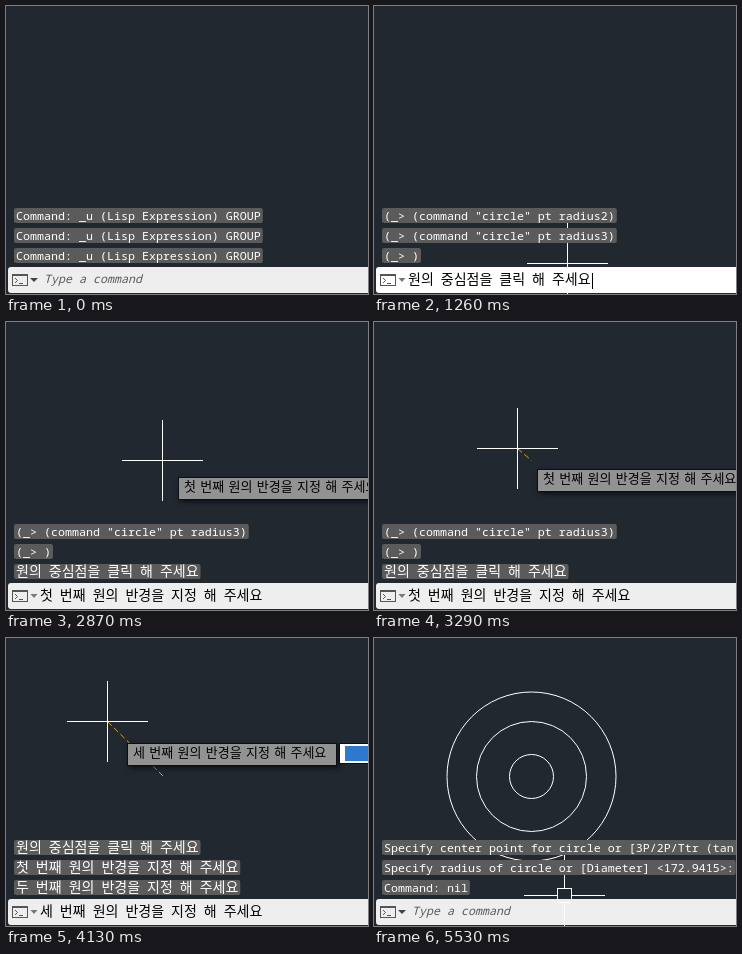
An HTML page with a canvas that plays this animation: 362 by 288 pixels, repeating every 6.44 s.

```html
<!DOCTYPE html>
<html lang="ko">
<head>
<meta charset="utf-8">
<title>Command line circles</title>
<style>
html, body { margin: 0; width: 100%; height: 100%; overflow: hidden; background: #212830; }
canvas { display: block; }
</style>
</head>
<body>
<canvas id="stage" width="362" height="288"></canvas>
<script>
const LOOP = 6440, STEP = 70;
const MONO = '11.67px "Noto Sans Mono", monospace';
const HANGUL = 'px "Noto Sans CJK KR", "Noto Sans CJK", sans-serif';
const center = [157.5, 138.5], radii = [22, 55, 84.5];
const g = document.getElementById('stage').getContext('2d');

const group = 'Command: _u (Lisp Expression) GROUP';
const draw = n => `(_> (command "circle" pt radius${n})`;
const askRadius = n => `${n} 번째 원의 반경을 지정 해 주세요`;
const askPoint = '원의 중심점을 클릭 해 주세요', end = '(_> )';
const [first, second, third] = ['첫', '두', '세'].map(askRadius);

// start time, history rows, prompt (null shows the placeholder)
const states = [
  [0, [group, group, group], null],
  [490, [group, group, group], ''],
  [630, [group, draw(1), draw(2)], '(_> '],
  [700, [draw(1), draw(2), draw(3)], '(_> '],
  [1190, [draw(2), draw(3), end], askPoint],
  [2660, [draw(3), end, askPoint], first],
  [3430, [end, askPoint, first], second],
  [3850, [askPoint, first, second], third],
  [4270, [first, second, third], null],
  [4340, ['Specify center point for circle or [3P/2P/Ttr (tan tan radius)]:',
    'Specify radius of circle or [Diameter] <172.9415>:', 'Command: nil'], null]
];

// time, cursor x y, tooltip x y
const path = [
  [1190, 193, 257, 209, 279], [1610, 193, 257, 209, 279],
  [1750, 147, 218, 163, 236], [1820, 147, 218, 163, 236],
  [1960, 161, 182, 175, 208], [2030, 161, 182, 175, 208],
  [2100, 160, 173, 173, 197], [2450, 156, 138, 172, 155],
  [2870, 156, 138, 172, 155], [3360, 141, 124, 161, 146],
  [3500, 141, 124, 161, 146], [3640, 125, 108, 145, 130],
  [3780, 118, 99, 138, 121], [3850, 118, 99, 138, 121],
  [4200, 97, 79, 117, 101], [4760, 97, 79, 117, 101],
  [4830, 106, 93, 126, 115], [5460, 190, 257, 210, 279]
];

function poseAt(t) {
  const i = path.findIndex(k => k[0] > t);
  if (i < 0) return path.at(-1).slice(1);
  const a = path[Math.max(i - 1, 0)], b = path[i];
  const f = Math.max(0, (t - a[0]) / (b[0] - a[0]));
  return a.slice(1).map((v, j) => Math.round(v + (b[j + 1] - v) * f));
}

function rect(x, y, w, h, color) {
  g.fillStyle = color;
  g.fillRect(x, y, w, h);
}

function rounded(x, y, w, h, r, color) {
  g.fillStyle = color;
  g.beginPath();
  g.roundRect(x, y, w, h, r);
  g.fill();
}

// Terminal text: narrow Latin cells and wider Hangul; returns its end x.
function text(s, x, y, color, paint = true) {
  for (const run of s.match(/[가-힣]+|[^가-힣]+/g) || []) {
    g.font = /[가-힣]/.test(run) ? 14 + HANGUL : MONO;
    g.fillStyle = color;
    if (paint) g.fillText(run, x, y);
    x += g.measureText(run).width;
  }
  return x;
}

function circles(hover) {
  for (const r of radii) {
    const d = Math.hypot(hover[0] - center[0], hover[1] - center[1]);
    const ring = (width, color) => {
      g.lineWidth = width;
      g.strokeStyle = color;
      g.beginPath();
      g.arc(...center, r, 0, 7);
      g.stroke();
    };
    if (Math.abs(d - r) < 8) ring(4, '#85888c');
    ring(1, '#fff');
  }
}

function crosshair(x, y, box) {
  const gap = box ? 7 : 0;
  for (const [from, to] of [[-40, -gap], [gap, 41]]) {
    rect(x + from, y, to - from, 1, '#fff');
    rect(x, y + from, 1, to - from, '#fff');
  }
  if (box) {
    g.strokeStyle = '#fff';
    g.lineWidth = 1;
    g.strokeRect(x - 6.5, y - 6.5, 14, 14);
  }
}

function rubberBand(x, y) {
  g.strokeStyle = '#d6a520';
  g.lineWidth = 1;
  g.setLineDash([6, 3]);
  g.beginPath();
  g.moveTo(x + .5, y + .5);
  g.lineTo(...center);
  g.stroke();
  g.setLineDash([]);
}

function tooltip(s, x, y) {
  g.font = 13 + HANGUL;
  g.wordSpacing = '1.4px';
  const w = Math.round(g.measureText(s).width) + 17;
  g.shadowColor = 'rgba(0,0,0,.6)';
  g.shadowBlur = 5;
  g.shadowOffsetX = g.shadowOffsetY = 2;
  rect(x, y, w, 23, '#0c0e11');
  g.shadowColor = 'transparent';
  rect(x + 1, y + 1, w - 2, 21, '#929292');
  g.fillStyle = '#000';
  g.fillText(s, x + 6, y + 14);
  g.wordSpacing = '0px';
  rect(x + w + 2, y, 60, 21, '#0c0e11');
  rect(x + w + 3, y + 1, 58, 19, '#fff');
  rect(x + w + 8, y + 3, 48, 15, '#2f78d0');
}

function commandBar(prompt, active) {
  rounded(2, 261, 364, 26, 3, active ? '#fff' : 'rgba(255,255,255,.92)');
  g.strokeStyle = '#555';
  g.lineWidth = 1;
  g.strokeRect(6.5, 268.5, 15, 11);
  rect(6, 268, 16, 2, '#555');
  g.beginPath();
  g.moveTo(9, 272);
  g.lineTo(11.5, 274.5);
  g.lineTo(9, 277);
  g.stroke();
  rect(13, 277, 4, 1, '#555');
  const idle = prompt === null, half = idle ? 4 : 3.5;
  g.fillStyle = idle ? '#444' : '#777';
  g.beginPath();
  g.moveTo(28 - half, 272);
  g.lineTo(28 + half, 272);
  g.lineTo(28, 276);
  g.fill();
  if (idle) {
    g.font = 'italic ' + MONO;
    g.fillStyle = '#5a5a5a';
    g.fillText('Type a command', 38, 277);
  } else {
    const x = text(prompt, 34, 278, '#000');
    if (active) rect(Math.round(x) + 1, 267, 1, 16, '#000');
  }
}

function render(now) {
  const t = Math.floor(now % LOOP / STEP) * STEP;
  const [, rows, prompt] = states.findLast(s => s[0] <= t);
  const [x, y, tipX, tipY] = poseAt(t);
  const done = t >= 4340;
  const active = t >= 70 && t < 1680 || t === 5460;

  rect(0, 0, 362, 288, '#212830');
  if (done) circles(poseAt(t - STEP));
  if (t >= 2730 && t < 4270) rubberBand(x, y);
  if (t >= 1190) crosshair(x, y, done);
  rows.forEach((row, i) => {
    const top = 202 + i * 20;
    rounded(8, top, text(row, 10, 0, '#fff', false) - 6, 15, 2, '#5b5b5b');
    text(row, 10, top + 12, '#fff');
  });
  commandBar(prompt, active);
  if (t >= 1750 && t < 4270) tooltip(prompt, tipX, tipY);
}

const start = performance.now();
function tick() {
  render(performance.now() - start);
  requestAnimationFrame(tick);
}
tick();
</script>
</body>
</html>
```
